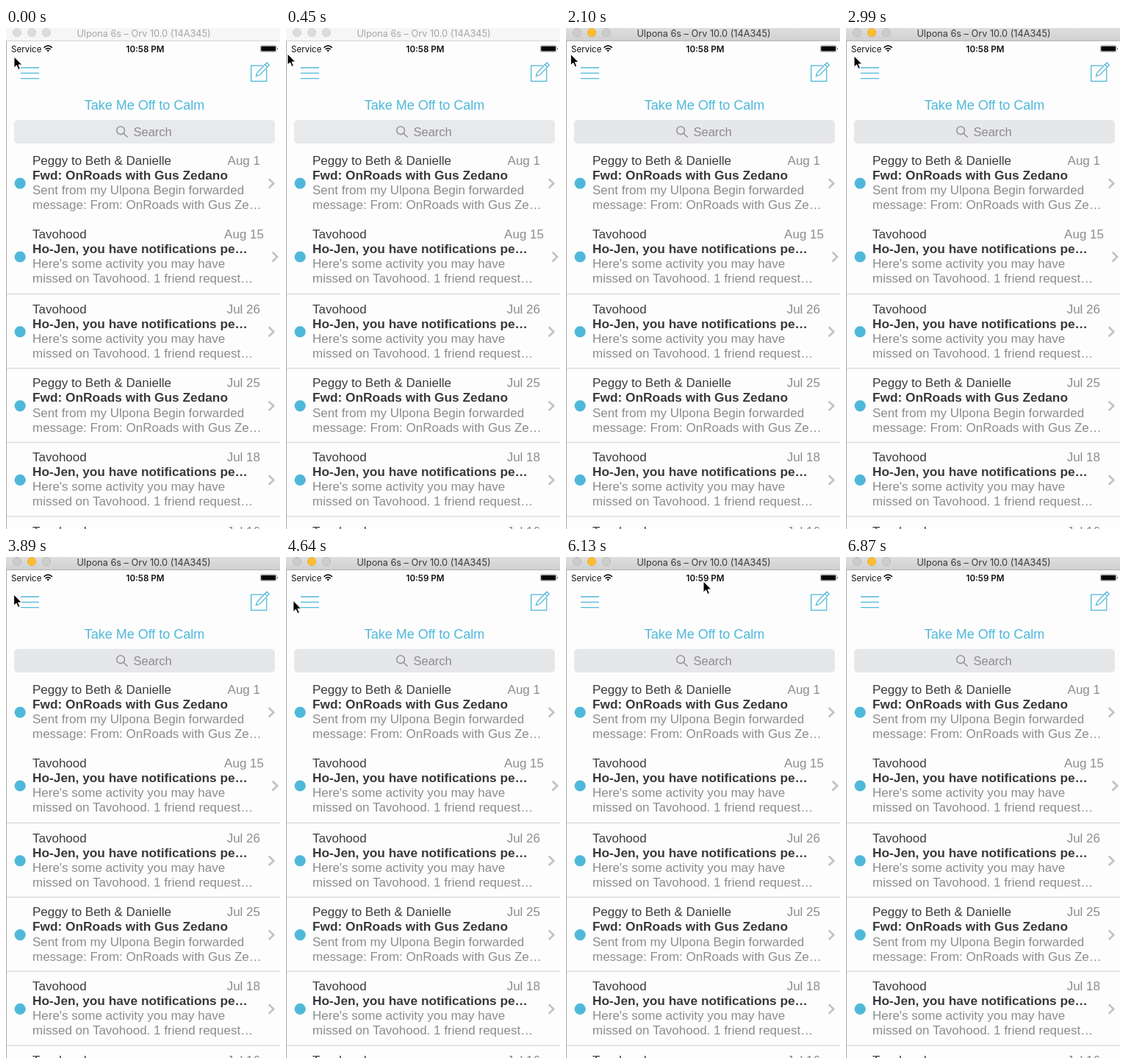
Write an HTML page that moves like this. It is 373 px wide and 681 px high and loops after 8000 ms.

```html
<!DOCTYPE html>
<html lang="en">
<head>
<meta charset="utf-8">
<title>Inbox</title>
<style>
  html, body { margin: 0; width: 100%; height: 100%; overflow: hidden; background: #fdfdfd; }
  svg { display: block; width: 373px; height: 681px; }
  text { font: 17px "Liberation Sans", Arial, sans-serif; fill: #8c8c8e; }
  .name { fill: #3c3c3e; }
  .subject { font-size: 17.3px; font-weight: bold; fill: #39393b; }
  .heading { font-size: 18px; fill: #4fb8da; }
  .hint { font-size: 16.5px; }
  .system { font-family: Inter, Roboto, sans-serif; font-size: 11.6px; fill: #111; }
  #title { font-size: 12.7px; }
  #clock { font-weight: 600; }
  .accent { fill: none; stroke: #4fb8da; stroke-width: 1.3; }
</style>
</head>
<body>
<svg viewBox="0 0 373 681">
  <defs>
    <linearGradient id="active" x2="0" y2="1">
      <stop stop-color="#dedede"/><stop offset="1" stop-color="#d0d0d0"/>
    </linearGradient>
  </defs>
  <rect width="373" height="681" fill="#fdfdfd"/>

  <rect id="bar" width="373" height="17"/>
  <path id="edge" d="M0 17.5H373"/>
  <g id="lights">
    <circle cx="15" cy="6.2" r="5.5"/>
    <circle cx="35" cy="6.2" r="5.5"/>
    <circle cx="55" cy="6.2" r="5.5"/>
  </g>
  <text id="title" class="system" x="187.5" y="12" text-anchor="middle">Ulpona 6s – Orv 10.0 (14A345)</text>

  <text class="system" x="7" y="32.5">Service</text>
  <g fill="none" stroke="#111" stroke-width="1.7">
    <path d="M51.5 26.8Q57.2 21.6 62.9 26.8M53.7 29.1Q57.2 26 60.7 29.1"/>
    <path d="M55.3 30.5Q57.2 29 59.1 30.5L57.2 32.6Z" fill="#111" stroke="none"/>
  </g>
  <text id="clock" class="system" x="189.5" y="32.5" text-anchor="middle"></text>
  <rect x="346.2" y="23.7" width="22" height="8.8" rx="1.8" fill="none" stroke="#8a8a8a" stroke-width=".6"/>
  <rect x="347.2" y="24.7" width="20" height="6.8" rx="1" fill="#050505"/>
  <path d="M369 26.4q1.6 1.7 0 3.4z" fill="#222"/>

  <path class="accent" d="M20 54H45M20 61.3H45M20 68.7H45"/>
  <path class="accent" d="M349.5 51.2H333.7V72.3H354.8V56M340.5 65.5L342.2 60.5L355 47.2L358.3 50.6L345.5 63.8ZM352.6 49.7L355.9 53.1"/>
  <text class="heading" x="188.5" y="111" text-anchor="middle">Take Me Off to Calm</text>

  <rect id="field" x="11" y="125" width="355" height="32" rx="5"/>
  <path d="M161.5 139.3a5.4 5.4 0 1 1-10.8 0a5.4 5.4 0 1 1 10.8 0M160 143.2L165.5 148.5" fill="none" stroke="#8c8c8e" stroke-width="1.4"/>
  <text class="hint" x="173.5" y="146.5">Search</text>

  <g id="list"></g>
  <path d="M.5 18V681" stroke="#a9a9a9"/>
  <path id="cursor" d="M0 0V15.2L3.5 11.9L5.9 17.5L8.4 16.4L6 11H10.8Z" stroke="#fff" stroke-linejoin="round"/>
</svg>
<script>
const $ = id => document.getElementById(id);
const LOOP = 8000, ACTIVATE = 1200, MINUTE = 4640, HIDE = 6870;
const ROW = 100.8, LINE = 20.1, STEP = 145;

const forwarded = ["Peggy to Beth & Danielle", "Fwd: OnRoads with Gus Zedano",
  "Sent from my Ulpona Begin forwarded", "message: From: OnRoads with Gus Ze…"];
const notice = ["Tavohood", "Ho-Jen, you have notifications pe…",
  "Here's some activity you may have", "missed on Tavohood. 1 friend request…"];
const mails = [
  [forwarded, "Aug 1"], [notice, "Aug 15"], [notice, "Jul 26"],
  [forwarded, "Jul 25"], [notice, "Jul 18"], [notice, "Jul 16"]
];

const label = (x, y, s, attrs = "") =>
  `<text x="${x}" y="${y}" ${attrs}>${s.replace("&", "&amp;")}</text>`;

// The second row sits a little off: its date and arrow hang out to the right.
function row([lines, date], i) {
  const shift = i === 1 ? 5 : 0;
  const kinds = ["name", "subject", "", ""];
  return `<g transform="translate(0 ${i * ROW - shift / 5})">
    ${i > 1 ? '<path d="M0 160H373" stroke="#cfcfd1"/>' : ""}
    <circle cx="19.2" cy="211.2" r="7.6" fill="#4fb8da"/>
    ${lines.map((s, n) => label(36, 186 + n * LINE, s, `class="${kinds[n]}"`)).join("")}
    ${label(346 + shift, 186, date, 'text-anchor="end"')}
    <path transform="translate(${shift})" d="M357.7 205L364.3 211.3L357.7 217.6" fill="none" stroke="#c4c4c8" stroke-width="2.8"/>
  </g>`;
}
$("list").innerHTML = mails.map(row).join("");

// Pointer strokes: when each begins and ends, and where it arrives.
const home = { x: 11, y: 39 };
const strokes = [
  { from: 150, to: 450, x: 2, y: 35 },
  { from: 1650, to: 2400, x: 10, y: 36 },
  { from: 2700, to: 2990, x: 11, y: 38 },
  { from: 3290, to: 3590, x: 11, y: 49 },
  { from: 3890, to: 4190, x: 9, y: 59 },
  { from: 4640, to: 5380, x: 22, y: 63 },
  { from: 5680, to: 5830, x: 187, y: 33 },
  { from: 6280, to: 6280, x: 186, y: 8 },
  { from: 6430, to: 6570, x: 171, y: 77 }
];

// Each stroke speeds up and is seen in discrete steps.
function pointer(t) {
  let { x, y } = home;
  for (const s of strokes) {
    if (t < s.from) break;
    const steps = Math.round((s.to - s.from) / STEP) + 1;
    const done = Math.floor((t - s.from) / STEP) + 1;
    const p = Math.min(1, done / steps) ** 1.5;
    x += (s.x - x) * p;
    y += (s.y - y) * p;
  }
  return { x, y };
}

function paint(el, fill, stroke) {
  el.setAttribute("fill", fill);
  el.setAttribute("stroke", stroke);
}

function draw(t) {
  const active = t >= ACTIVATE;
  const [left, middle, right] = $("lights").children;
  for (const light of [left, middle, right])
    paint(light, active ? "#cdcdcd" : "#dcdcdc", active ? "#bababa" : "#d0d0d0");
  if (active) paint(middle, "#fdbd2f", "#e9aa2c");
  paint($("bar"), active ? "url(#active)" : "#f6f6f6", "none");
  paint($("edge"), "none", active ? "#b4b4b4" : "#d4d4d4");
  paint($("field"), active ? "#e6e7e9" : "#e8e9eb", "none");
  $("title").style.fill = active ? "#3a3a3a" : "#a6a6a6";
  $("clock").textContent = t < MINUTE ? "10:58 PM" : "10:59 PM";

  const { x, y } = pointer(t);
  $("cursor").setAttribute("transform", `translate(${x} ${y})`);
  $("cursor").setAttribute("visibility", t < HIDE ? "visible" : "hidden");
}

const start = performance.now();
function tick() {
  draw((performance.now() - start) % LOOP);
  requestAnimationFrame(tick);
}
tick();
</script>
</body>
</html>
```
